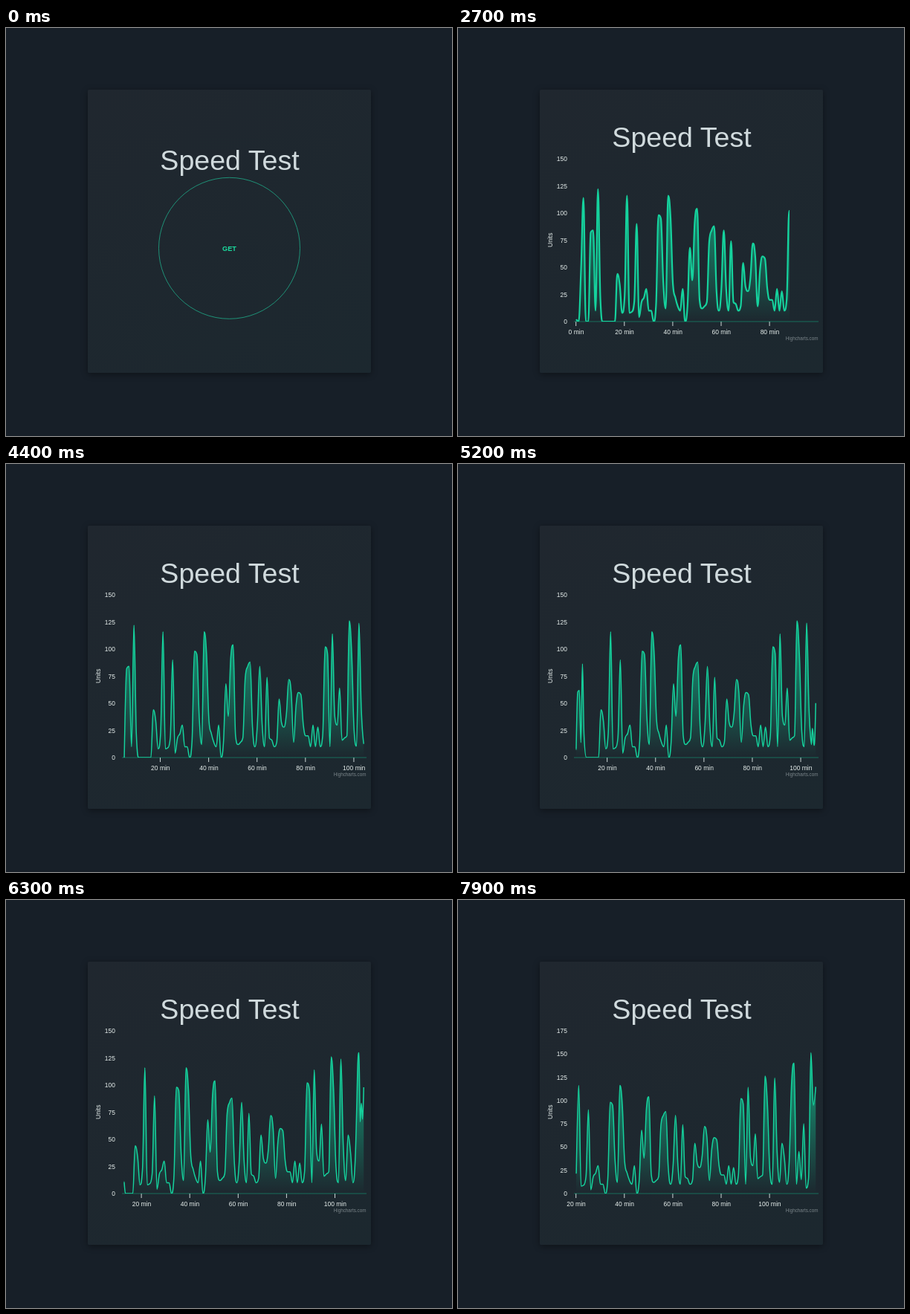
Animation of 600 by 549 pixels, one loop 8000 ms. Source, as an HTML page:

```html
<!DOCTYPE html>
<html lang="en">
<head>
<meta charset="utf-8">
<title>Speed Test</title>
<style>
  html, body { margin: 0; width: 100%; height: 100%; overflow: hidden; background: #171f28; }
  svg { position: fixed; left: 0; top: 0; width: 600px; height: 549px; font-family: "Liberation Sans", Arial, sans-serif; }
  .card { position: fixed; left: 110px; top: 83px; width: 381px; height: 381px; border-radius: 2px;
    background: linear-gradient(150deg, #20272f, #1c282f); box-shadow: 0 2px 9px rgba(0, 0, 0, .4); }
  .label { font-size: 8.5px; fill: #e6eeec; }
</style>
</head>
<body>
<div class="card"></div>
<svg viewBox="0 0 600 549">
  <defs>
    <linearGradient id="fade" gradientUnits="userSpaceOnUse" x1="0" x2="0" y1="210" y2="395">
      <stop offset="0" stop-color="#12cf9a" stop-opacity=".75"/>
      <stop offset="1" stop-color="#12cf9a" stop-opacity="0"/>
    </linearGradient>
    <clipPath id="plot"><rect id="reveal" x="156" y="170" width="329" height="225"/></clipPath>
    <clipPath id="frame"><rect x="115" y="166" width="375" height="260"/></clipPath>
  </defs>
  <text id="title" x="301" y="191.3" text-anchor="middle" font-size="37.6" fill="#d0dadd">Speed Test</text>
  <g id="start">
    <circle id="ring" cx="300.5" cy="296.3" r="95" fill="#12cf9a" fill-opacity="0" stroke="#1fb58f"/>
    <text x="300.5" y="299.6" text-anchor="middle" font-size="9.2" font-weight="bold" fill="#1bdc9f">GET</text>
  </g>
  <g id="chart" clip-path="url(#frame)">
    <g id="axes"></g>
    <text class="label" text-anchor="middle" transform="translate(126.5 285.3) rotate(-90)">Units</text>
    <text x="484.5" y="420.3" text-anchor="end" font-size="6.3" fill="#7b858a">Highcharts.com</text>
    <path d="M156 395H485" stroke="#12cf9a" stroke-opacity=".42"/>
    <g clip-path="url(#plot)">
      <path id="area" fill="url(#fade)"/>
      <path id="line" fill="none" stroke="#15d29d" stroke-linejoin="round"/>
    </g>
  </g>
</svg>
<script>
const LOOP = 8000, X0 = 159, Y0 = 395, DX = 3.255, COUNT = 100, BATCH = 5;
const SCALE = 1.46, SCALE_175 = 1.2514, LAG = 45;
const updates = [[3740, 650], [4751, 1000], [5762, 1000], [6917, 1000]];
const data = [
  2, 0, 48, 114, 0, 0, 82, 84, 10, 122, 21, 0, 0, 0, 0, 0, 0, 44, 34, 8,
  22, 116, 8, 9, 18, 90, 4, 18, 22, 30, 10, 10, 0, 15, 98, 95, 36, 12, 116, 96,
  34, 22, 14, 10, 30, 0, 14, 68, 38, 92, 104, 20, 12, 14, 18, 74, 84, 88, 28, 10,
  30, 84, 30, 10, 74, 18, 16, 10, 14, 54, 32, 28, 40, 72, 60, 14, 48, 60, 58, 30,
  20, 20, 10, 30, 10, 28, 10, 20, 102, 96, 10, 114, 38, 30, 64, 16, 18, 20, 126, 96,
  24, 10, 124, 44, 12, 54, 38, 10, 35, 120, 140, 10, 45, 15, 75, 5, 15, 152, 95, 115
];

const $ = id => document.getElementById(id);
const set = (el, attrs) => { for (const k in attrs) el.setAttribute(k, attrs[k]); return el; };
const make = (tag, attrs) => $('axes').appendChild(set(document.createElementNS('http://www.w3.org/2000/svg', tag), attrs));
const ramp = (t, from, length) => Math.min(1, Math.max(0, (t - from) / length));
const ease = p => (1 - Math.cos(Math.PI * p)) / 2;
const mix = (a, b, p) => a + (b - a) * p;

const yLabels = Array.from({ length: 8 }, (_, i) => {
  const el = make('text', { class: 'label', x: 147, 'text-anchor': 'end' });
  el.textContent = i * 25;
  return el;
});
const xTicks = Array.from({ length: 6 }, (_, i) => {
  const mark = make('path', { d: 'M0 395V401', stroke: '#cdd6d6' });
  const label = make('text', { class: 'label', y: 412, 'text-anchor': 'middle' });
  label.textContent = i * 20 + ' min';
  return { mark, label };
});

// Handles on both sides of a point, kept level with the neighbours so peaks never overshoot
function handles(prev, [x, y], next) {
  const soft = (a, b) => (1.5 * a + b) / 2.5;
  const lx = soft(x, prev[0]), rx = soft(x, next[0]);
  let ly = soft(y, prev[1]), ry = soft(y, next[1]);
  const fix = (ry - ly) * (rx - x) / (rx - lx) + y - ry;
  ly += fix;
  ry += fix;
  const within = (v, a, b) => Math.min(Math.max(a, b), Math.max(Math.min(a, b), v));
  const l2 = within(ly, prev[1], y);
  if (l2 !== ly) { ly = l2; ry = 2 * y - ly; }
  const r2 = within(ry, next[1], y);
  if (r2 !== ry) { ry = r2; ly = 2 * y - ry; }
  return [lx, ly, rx, ry];
}

// Each segment: two control points and an end point
function segments(step) {
  const scale = step === updates.length ? SCALE_175 : SCALE;
  const pts = data.slice(step * BATCH, step * BATCH + COUNT).map((v, i) => [X0 + i * DX, Y0 - v * scale]);
  let out = pts[0];
  return pts.map((p, i) => {
    if (!i || i === COUNT - 1) return [...out, ...p, ...p];
    const [lx, ly, rx, ry] = handles(pts[i - 1], p, pts[i + 1]);
    const seg = [...out, lx, ly, ...p];
    out = [rx, ry];
    return seg;
  });
}
const shapes = [0, 1, 2, 3, 4].map(segments);
const dot = ([, , , , x, y]) => [x, y, x, y, x, y];

// Old points fold into the left edge while new ones unfold from the last point
function blend(step, p) {
  const from = shapes[step], to = shapes[step + 1];
  if (!to || p === 0) return from;
  const a = from.concat(Array(BATCH).fill(dot(from[COUNT - 1])));
  const b = Array(BATCH).fill(dot(to[0])).concat(to);
  return a.map((seg, i) => seg.map((v, j) => mix(v, b[i][j], p)));
}

function drawSeries(t) {
  let step = 0, p = 0;
  updates.forEach(([at, length], i) => {
    if (t >= at + LAG) { step = i; p = ease(ramp(t, at + LAG, length)); }
  });
  const segs = blend(step, p);
  const first = segs[0], last = segs[segs.length - 1];
  const d = `M${first[4]} ${first[5]}` + segs.slice(1).map(s => 'C' + s.map(v => v.toFixed(2)).join(' ')).join('');
  set($('line'), { d, 'stroke-width': mix(2.2, 1.5, ramp(t, 3200, 300)) });
  set($('area'), { d: `${d}L${last[4]} ${Y0}L${first[4]} ${Y0}Z` });
  set($('fade'), { y1: Math.min(...segs.map(s => s[5])) });
  set($('reveal'), { width: 329 * ease(ramp(t, 1925, 1000)) });
}

function drawAxes(t) {
  const ps = updates.map(([at, length]) => ease(ramp(t, at, length)));
  const min = BATCH * ps.reduce((a, b) => a + b);
  const scale = mix(SCALE, SCALE_175, ps[3]);
  yLabels.forEach((el, i) => set(el, { y: Y0 + 3 - i * 25 * scale, opacity: i === 7 ? ps[3] : 1 }));
  xTicks.forEach(({ mark, label }, i) => {
    const x = X0 + (i * 20 - min) * DX, opacity = i ? 1 : 1 - ps[0];
    const shown = x < 482 ? opacity : 0;
    set(mark, { transform: `translate(${x - .3} 0)`, opacity: shown });
    set(label, { x, opacity: shown });
  });
}

function draw(t) {
  const open = t >= 1900;
  set($('title'), { y: open ? 159.6 : 191.3 });
  $('start').style.display = open ? 'none' : '';
  $('chart').style.display = open ? '' : 'none';
  if (open) {
    drawAxes(t);
    drawSeries(t);
  } else {
    const hover = ramp(t, 550, 350), press = ramp(t, 1050, 150);
    set($('ring'), {
      'fill-opacity': .12 * hover + .06 * press,
      'stroke-opacity': .75 + .25 * hover,
      'stroke-width': 1 + 1.5 * hover
    });
  }
}

const begin = performance.now();
function tick() {
  draw((performance.now() - begin) % LOOP);
  requestAnimationFrame(tick);
}
tick();
</script>
</body>
</html>
```
